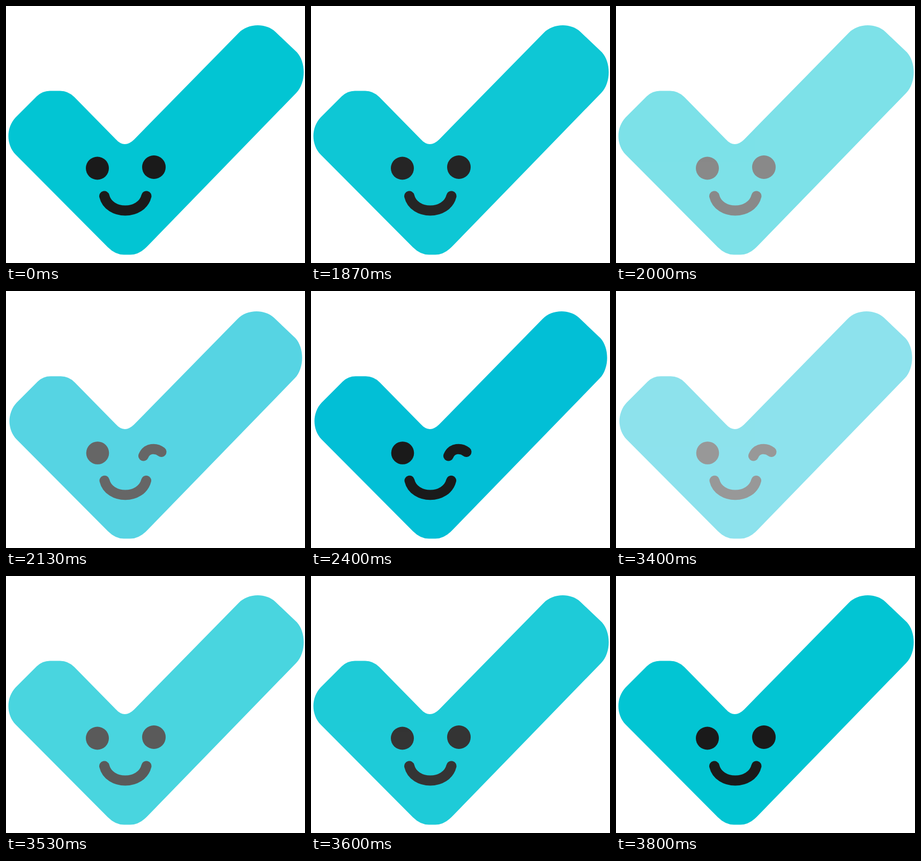
Write an HTML page without scripts that moves like this. It is 558 px wide and 480 px high and loops after 5.53 s.

```html
<!DOCTYPE html>
<html lang="en">
<head>
<meta charset="utf-8">
<title>Winking check mark</title>
<style>
  html, body { margin: 0; width: 100%; height: 100%; overflow: hidden; background: #fff; }
  svg { display: block; width: 100vw; height: 100vh; }

  .face { animation: 5530ms step-end infinite; }
  .open { color: #02c5d3; animation-name: open; }
  .wink { color: #02bfd6; animation-name: wink; }
  .small { transform: translate(224px, 254px) scale(.991) translate(-224px, -254px); }

  .ink { fill: #1a1a1a; }
  .line { fill: none; stroke: #1a1a1a; stroke-width: 19; stroke-linecap: round; }

  /* Each face dims, swaps while pale, then eases back in. */
  @keyframes open {
    0% { opacity: 1; }
    33.815% { opacity: .95; }
    34.9% { opacity: .755; }
    36.166% { opacity: .515; }
    37.432% { opacity: 0; }
    62.748% { opacity: .4; }
    63.833% { opacity: .72; }
    65.099% { opacity: .89; }
    66.365% { opacity: .97; }
    68.716%, 100% { opacity: 1; }
  }
  @keyframes wink {
    0% { opacity: 0; }
    37.432% { opacity: .34; }
    38.517% { opacity: .67; }
    39.783% { opacity: .86; }
    41.048% { opacity: .95; }
    42.133% { opacity: .99; }
    43.399% { opacity: 1; }
    59.132% { opacity: .9; }
    60.216% { opacity: .69; }
    61.482% { opacity: .45; }
    62.748%, 100% { opacity: 0; }
  }
</style>
</head>
<body>
<svg viewBox="0 0 558 480">
  <defs>
    <g id="base">
      <path fill="currentColor" d="M434 50.5 C451 32.5 484 31 502.5 48 L543 86.5
        C560 105 560 143 542 162 L265 447.5 Q249 464.5 232 464.5
        H220 Q204 464.5 190 450.5 L18 277.5 C0 259 0 227 18 208
        L57.5 168.5 Q68 158.5 82 158.5 H101 Q116 158.5 127.5 170
        L204.5 248.5 Q221 267 239 249.5 Z"/>
      <circle class="ink" cx="170.5" cy="303" r="21.5"/>
      <path class="line" d="M183.5 355 C192 391 253 391 262 355"/>
    </g>
  </defs>
  <g class="face open">
    <use href="#base"/>
    <circle class="ink" cx="276" cy="301" r="22"/>
  </g>
  <g class="face wink">
    <use class="small" href="#base"/>
    <path class="line" d="M256.5 308 C263 292.5 280 292.5 290 300.5"/>
  </g>
</svg>
</body>
</html>
```
